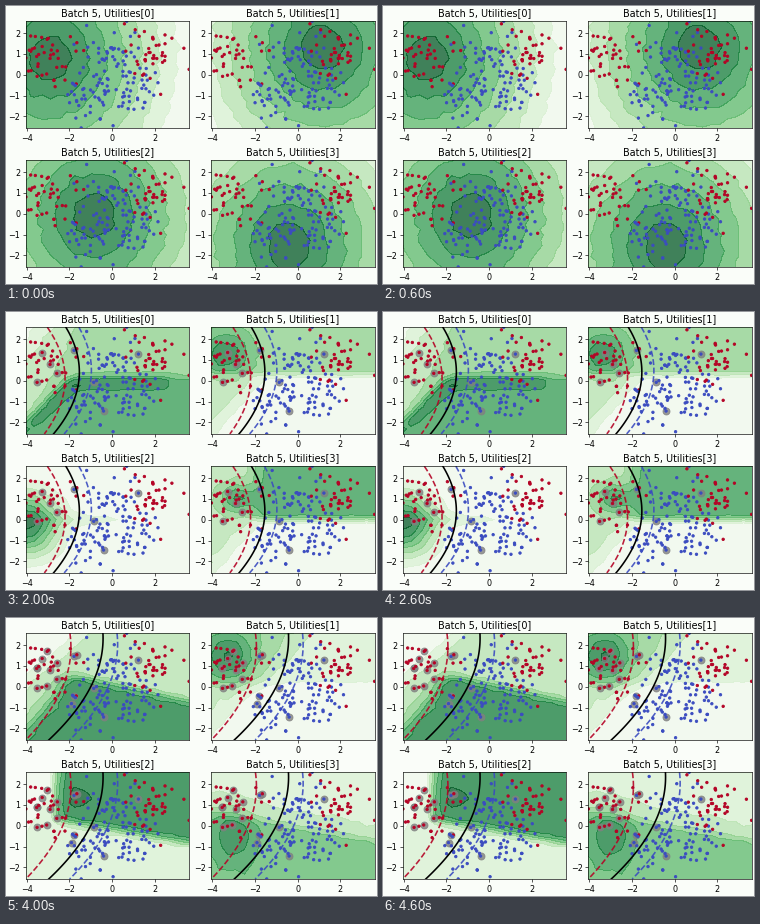
Animation, 371 px wide and 278 px high, one loop 5000 ms. Source, as a matplotlib script:

```python
import numpy as np
import matplotlib.pyplot as plt
from matplotlib.animation import FuncAnimation

W, H, DPI = 371, 278, 64
K = 58 / DPI                 # scale of the default point sizes
RED, BLUE = "#b40426", "#3b4cc0"

plt.rcParams.update({
    "font.family": "DejaVu Sans", "font.size": 10 * K,
    "axes.linewidth": .8 * K, "axes.titlepad": 6 * K, "lines.linewidth": 1.5 * K,
})
for axis in ("xtick", "ytick"):
    plt.rcParams.update({f"{axis}.major.size": 3.5 * K, f"{axis}.major.pad": 3.5 * K,
                         f"{axis}.major.width": .8 * K})

# Five Gaussian blobs, classes alternate from blob to blob.
rng = np.random.RandomState(0)
centers = [[0, 1], [-3, .5], [-1, -1], [2, 1], [1, -.5]]
X = np.vstack([rng.normal(c, .7, (40, 2)) for c in centers])
dot_colors = [RED if i // 40 % 2 else BLUE for i in range(len(X))]
lo, hi = X.min(axis=0), X.max(axis=0)

gx, gy = np.meshgrid(*(np.linspace(a, b, 21) for a, b in zip(lo, hi)))


def half(x, y, deg, soft=.1):
    """Soft half-plane: 1 on the side that deg points to."""
    a = np.radians(deg)
    d = (gx - x) * np.cos(a) + (gy - y) * np.sin(a)
    return .5 + .5 * np.tanh(d / (2 * soft))


def bump(x, y, rx, ry):
    return np.exp(-((gx - x) / rx) ** 2 - ((gy - y) / ry) ** 2)


def cone(x, y):
    return 1.02 - .15 * np.hypot(gx - x, .9 * (gy - y))


# Points labelled in each batch, snapped to the nearest sample.
batches = [
    [],
    [(-2.9, .8), (1.2, 1.3), (-.85, -.1), (-.4, -1.5)],
    [(-2.6, .35), (-3.3, 1.35), (-1.75, 1.45), (-3.6, 0)],
    [(-1.9, -.8), (-3.6, .9), (-3.05, .05), (-2.6, 1.35)],
    [(-3, 1.7), (-1.85, -.5), (-3.55, .9), (-1.6, 1.55)],
]
chosen = [[np.argmin(np.hypot(*(X - p).T)) for p in b] for b in batches]


def scene_0():
    """Without labels, utility falls off around each coming pick."""
    return [cone(x, y) for x, y in batches[1]]


def scene_1():
    above = half(-2.4, -.4, 67)
    wedge = above * half(0, 1.1, -90, .06) * half(-2.6, 0, 0)
    band = wedge * half(-2.4, .4, 247)
    sheet = half(-1.9, -.2, 66) * (.44 + .37 * half(-2.4, 0, 0))
    return [
        .31 + .25 * wedge + .25 * band + .5 * bump(-2.9, .8, .9, 1),
        .31 * half(-1.3, .05, 63) * half(-3, -.1, 108) + .52 * bump(-3.2, 1.4, 1.3, 1.1),
        sheet + .13 * half(0, 1.15, 90, .06) * half(-2, 0, 0),
        .17 - .1 * half(0, 1, 63) + .27 * half(-1.5, .3, 245)
        + .25 * half(-2, -.35, 245) + .22 * bump(-3.5, -.2, 1, 1),
    ]


def scene_2():
    low = half(0, .15, -90, .08) * half(-3, -.9, -45)
    core = half(0, -.35, -90, .08) * half(-2.5, -1.1, -45)
    ridge = low * (1 - core) * half(2.6, 0, 180)
    corner = half(-2.6, -.9, 140, .3)
    return [
        .31 - .2 * half(-3.5, 1.9, 140, .2) + .15 * half(-2.2, 1.3, -25, .3)
        + .23 * low + .23 * ridge,
        np.maximum(.44 * half(0, .25, 90, .06), .31 * corner) + .42 * bump(-3.4, 1.3, 1.1, 1),
        .9 * bump(-4, -.2, 1.5, 1.5) + .17 * bump(-1, 0, 2.5, .3),
        np.maximum(.69 * half(0, 0, 90, .07) * half(-2.3, 0, 0, .3), .31 * corner)
        + .5 * bump(-2.8, 1, .8, .7),
    ]


def scene_3():
    top = half(0, .4, 90, .08)
    return [
        .06 + .12 * half(0, -1, 90, .2) + .38 * top + .33 * bump(-3, 1.7, 1.2, 1),
        .19 + .12 * half(-2.6, 1, 0, .2) + .38 * (1 - top) * half(-3, -1, -20, .15)
        + .2 * bump(-2.2, .1, .6, .6),
        .75 * bump(-4, .6, 1.5, 1.9) + .25 * bump(0, .7, 5, .25),
        .18 * half(-3, -1, 60, .3) + .13 * half(0, -1.1, 90) * half(-3.3, 0, 0, .3)
        + .6 * top * half(-2.1, 0, 0, .2),
    ]


def scene_4():
    slope = half(-1, .35, -103)
    return [
        .06 + .25 * half(-2.6, 1.5, -50, .2) + .5 * slope * half(-3.2, -1, -40, .2)
        + .12 * bump(-2, .1, .6, .5),
        .19 * half(0, .1, 90, .15) + .25 * half(-2.4, -.4, 140, .3)
        + .45 * bump(-3.3, 1.5, 1.2, 1.2),
        .19 + .62 * half(-1, 0, 80) * half(-2.6, 0, 0) + .13 * bump(-1.5, 1.3, .6, .6)
        - .15 * half(-3.2, 1.2, 150, .2),
        .19 + .12 * half(-1, .9, -100, .2) + .25 * half(-1, .1, -100, .08)
        + .3 * bump(-3, -.5, 1, 1.4),
    ]


fields = [s() for s in (scene_0, scene_1, scene_2, scene_3, scene_4)]
noise = rng.normal(0, .012, (4,) + gx.shape)

# Boundary x at the top, middle and bottom edge; distance of the red and the
# blue dashed line at top and bottom.
boundaries = [
    None,
    [(-1.23, -1.98, -3.76), (-.36, -.42), (.37, .47)],
    [(-2.17, -1.56, -2.75), (-.87, -.43), (.61, .5)],
    [(-1.79, -1.6, -3.3), (-.76, -.8), (.66, .9)],
    [(-.43, -1, -2.97), (-1.55, -1.08), (.66, .98)],
]

fig, axes = plt.subplots(2, 2, figsize=(W / DPI, H / DPI), dpi=DPI,
                         layout="constrained", facecolor="#fafdf9")
fig.get_layout_engine().set(w_pad=K / 24, h_pad=K / 24)


def draw_boundary(ax, knots, red_gap, blue_gap):
    t = np.linspace(0, 1, 60)
    y = hi[1] + t * (lo[1] - hi[1])
    mid = np.polyval(np.polyfit([0, .5, 1], knots, 2), t)
    for gap, color, dash in ((red_gap, RED, "--"), ((0, 0), "black", "-"),
                             (blue_gap, BLUE, "--")):
        ax.plot(mid + np.interp(t, [0, 1], gap), y, dash, color=color,
                lw=2 * K, alpha=1 if dash == "-" else .9)


def draw_panel(ax, batch, panel):
    ax.cla()
    z = np.clip(fields[batch][panel] + noise[panel], 0, 1)
    ax.contourf(gx, gy, z, levels=np.linspace(0, 1, 9), cmap="Greens", alpha=.75)
    known = sum(chosen[:batch + 1], [])
    ax.scatter(*X[known].T, c="grey", alpha=.8, marker=".", s=300 * K * K, zorder=1.5)
    ax.scatter(*X.T, c=dot_colors, marker=".", s=36 * K * K, zorder=2)
    if boundaries[batch]:
        draw_boundary(ax, *boundaries[batch])
    ax.set(xlim=(lo[0], hi[0]), ylim=(lo[1], hi[1]),
           xticks=range(-4, 3, 2), yticks=range(-2, 3),
           title=f"Batch 5, Utilities[{panel}]")


def update(batch):
    for panel, ax in enumerate(axes.flat):
        draw_panel(ax, batch, panel)
    return list(axes.flat)


anim = FuncAnimation(fig, update, frames=5, interval=1000, repeat=True, blit=False)
plt.show()
```
